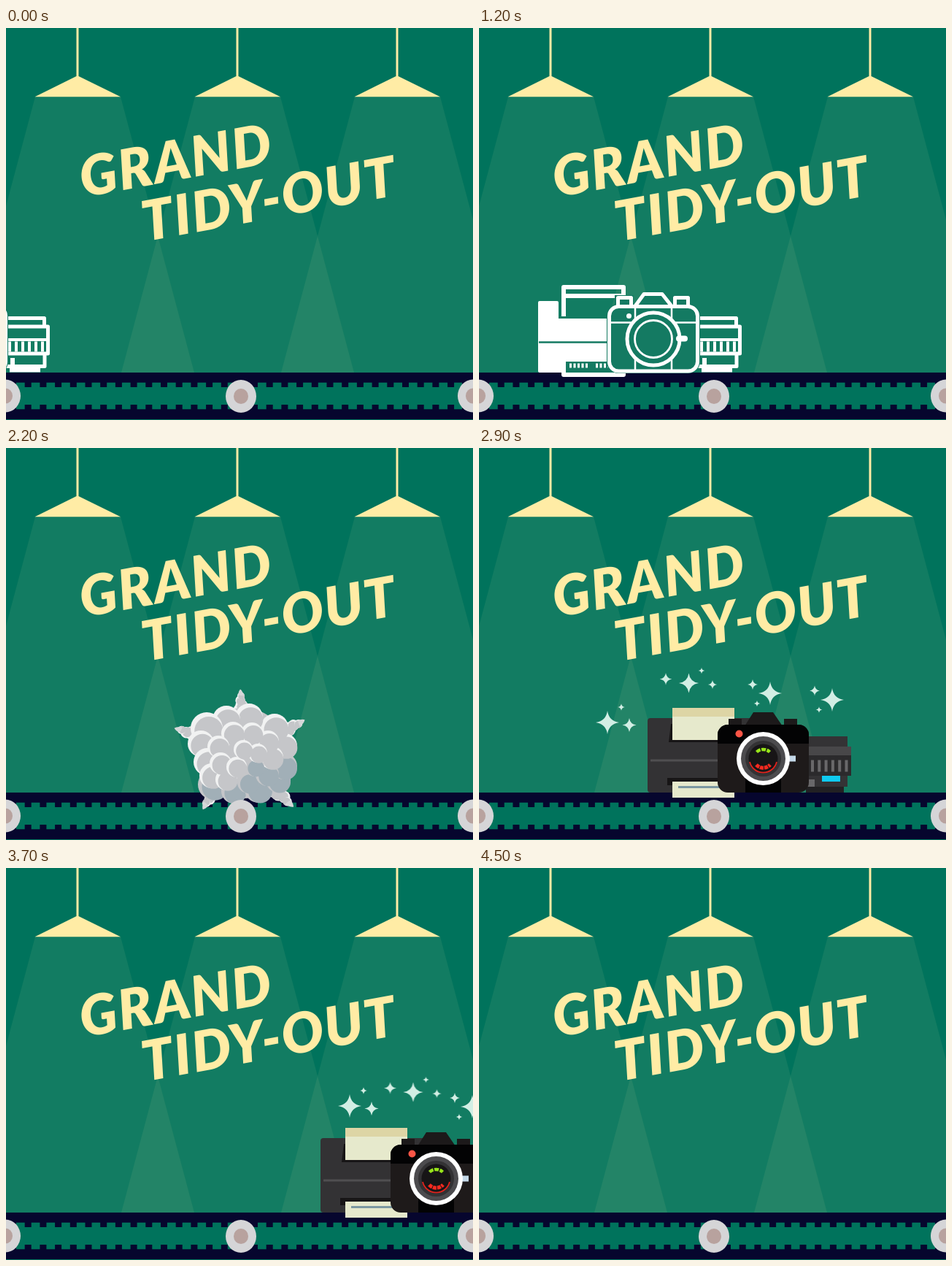
An HTML page without scripts for the animation above (5.5 s loop, 640 by 537 pixels).

```html
<!DOCTYPE html>
<html lang="en">
<head>
<meta charset="utf-8">
<title>Conveyor clean-up</title>
<style>
html, body { margin: 0; width: 100%; height: 100%; overflow: hidden; background: #00735c; }
svg { display: block; width: 100vw; height: 100vh; }
.title { font: italic 900 76px Lato, "Open Sans", sans-serif; letter-spacing: 2px; fill: #ffeca5; }
.dirty, .clean, .cloud, .inner, .stars g { animation: 5500ms step-end infinite; }
.dirty { animation-name: arrive; }
.cloud { animation-name: burst; transform-origin: 320px 413px; }
.inner { animation-name: churn; transform-origin: 322px 416px; }
.clean { animation-name: leave; }
.stars .a { animation-name: driftA; }
.stars .b { animation-name: driftB; }
.stars .c { animation-name: driftC; }
.stars .d { animation-name: driftD; }

@keyframes arrive {
  0% { transform: translateX(-400px); visibility: visible; animation-timing-function: steps(8, end); }
  29.09% { transform: none; visibility: visible; }
  32.72%, 100% { transform: none; visibility: hidden; }
}
@keyframes burst {
  0% { visibility: hidden; }
  32.72% { visibility: visible; transform: rotate(36deg); }
  36.36% { visibility: visible; transform: none; }
  43.63%, 100% { visibility: hidden; }
}
@keyframes churn {
  0% { transform: rotate(14deg); }
  40%, 100% { transform: none; }
}
@keyframes leave {
  0% { visibility: hidden; transform: translateX(-50px); }
  43.63% { visibility: visible; transform: translateX(-50px); }
  52.72% { visibility: visible; transform: none; animation-timing-function: steps(8, end); }
  81.81%, 100% { visibility: hidden; transform: translateX(400px); }
}
@keyframes driftA {
  0% { visibility: hidden; }
  43.63% { visibility: visible; transform: translate(-20px, 8px); }
  52.72% { visibility: visible; transform: none; }
  56.36% { visibility: visible; transform: translate(92px, -16px); }
  60% { visibility: visible; transform: translate(170px, -31px); }
  63.63% { visibility: visible; transform: translate(202px, -38px); }
  67.27% { visibility: visible; transform: translate(295px, -50px); }
  70.9% { visibility: visible; transform: translate(390px, -58px); }
  74.54%, 100% { visibility: hidden; }
}
@keyframes driftB {
  0% { visibility: hidden; }
  43.63% { visibility: visible; transform: translate(-30px, 6px); }
  52.72% { visibility: visible; transform: none; }
  56.36% { visibility: visible; transform: translate(68px, -5px); }
  60% { visibility: visible; transform: translate(135px, -13px); }
  63.63% { visibility: visible; transform: translate(202px, -14px); }
  67.27% { visibility: visible; transform: translate(270.5px, -15px); }
  70.9% { visibility: visible; transform: translate(337px, -11px); }
  74.54%, 100% { visibility: hidden; }
}
@keyframes driftC {
  0% { visibility: hidden; }
  43.63% { visibility: visible; transform: translate(-40px, 4px); }
  52.72% { visibility: visible; transform: none; }
  56.36% { visibility: visible; transform: translate(60px, -3px); }
  60% { visibility: visible; transform: translate(120px, -5px); }
  63.63% { visibility: visible; transform: translate(180px, -7px); }
  67.27% { visibility: visible; transform: translate(240px, -9px); }
  70.9%, 100% { visibility: hidden; }
}
@keyframes driftD {
  0% { visibility: hidden; }
  43.63% { visibility: visible; transform: translate(-42px, 3px); }
  52.72% { visibility: visible; transform: none; }
  56.36% { visibility: visible; transform: translate(55px, -3px); }
  60% { visibility: visible; transform: translate(105px, -5px); }
  63.63%, 100% { visibility: hidden; }
}
</style>
</head>
<body>
<svg viewBox="0 0 640 537" preserveAspectRatio="none">
  <defs>
    <g id="lamp" fill="#ffeca5">
      <path d="M40 94H157L258 472H-61Z" opacity=".072"/>
      <path d="M96.500 0h3V66L157 94.200H39.500L96.500 66Z"/>
    </g>
    <g id="wheel">
      <ellipse rx="21" ry="22.500" fill="#d5d5d7"/>
      <ellipse rx="10" ry="10.500" fill="#b8a29e"/>
    </g>
    <path id="star" d="M0-16Q2-2 16 0Q2 2 0 16Q-2 2-16 0Q-2-2 0-16Z"/>
    <g id="puff">
      <circle r="10" fill="#f1f2f2"/>
      <circle cx="1.300" cy="1.600" r="8.900" fill="#c5c6c9"/>
    </g>
    <g id="shade">
      <circle r="10" fill="#c5c6c9"/>
      <circle cx="1.300" cy="1.600" r="8.700" fill="#a1afb7"/>
    </g>
    <g id="spike">
      <use href="#puff" transform="translate(0 -62) scale(1.200)"/>
      <use href="#puff" transform="translate(1 -70) scale(.95)"/>
      <use href="#puff" transform="translate(-1 -78) scale(.75)"/>
      <use href="#puff" transform="translate(0 -85) scale(.55)"/>
      <path d="M-4-86Q-4-92-1-95Q3-92 4-85Z" fill="#d6d7d9"/>
    </g>
  </defs>

  <rect width="640" height="537" fill="#00735c"/>
  <use href="#lamp"/>
  <use href="#lamp" x="219"/>
  <use href="#lamp" x="438"/>

  <g class="title">
    <text transform="translate(106 232) rotate(-10.400)">GRAND</text>
    <text transform="translate(191 292.500) rotate(-10.400)">TIDY-OUT</text>
  </g>

  <!-- belt -->
  <rect y="472" width="640" height="64" fill="#06062e"/>
  <rect y="492" width="640" height="24" fill="#00735c"/>
  <path d="M14 489H310M345 489H625M14 519H310M345 519H625" stroke="#00735c" stroke-width="6.500" stroke-dasharray="11.700 9"/>

  <!-- worn devices -->
  <g class="dirty" fill="none" stroke="#fff">
    <path d="M183 374h24a2 2 0 0 1 2 2v22h70v74H183a2 2 0 0 1-2-2V376a2 2 0 0 1 2-2Z" fill="#fff" stroke="none"/>
    <path d="M182 430.500H277" stroke="#147a62" stroke-width="2.500"/>
    <path d="M216 395V355H298V372M216 367H298" stroke-width="6" stroke-linejoin="round"/>
    <path d="M213 457H300V475H216Z" fill="#147a62" stroke="none"/>
    <path d="M216 456V475H298V468" stroke-width="6" stroke-linejoin="round"/>
    <path d="M224 462.500H250M260 462.500H277" stroke-width="6" stroke-dasharray="3 2.500"/>

    <path d="M398 397.500H452.500V408M398 409H457.500V446H398M453 446V463.500H400" stroke-width="5" stroke-linejoin="round"/>
    <path d="M400 427H458M400 446H458" stroke-width="4"/>
    <path d="M403 436.500H455" stroke-width="14" stroke-dasharray="4 5"/>
    <path d="M405 468.500H447M409 452V465" stroke-width="6"/>

    <rect x="275" y="378" width="128" height="95" rx="16" fill="#147a62" stroke="none"/>
    <path d="M287 380V367H311V380M365 380V367H390V380" fill="#147a62" stroke="#147a62" stroke-width="2"/>
    <path d="M290.500 380V369.500H308.500V380M368.500 380V369.500H386.500V380M314 381L326 364.500H351L364 381" stroke-width="5" fill="#147a62" stroke-linejoin="round"/>
    <rect x="278.500" y="381.500" width="121" height="88.500" rx="13" fill="#147a62" stroke-width="5"/>
    <path d="M280 403.500H312M367 403.500H398M314 382V400M364 382V400M314 452V469M364 452V469" stroke-width="2.500"/>
    <circle cx="305.500" cy="394.500" r="3.500" fill="#fff" stroke="none"/>
    <circle cx="339" cy="426" r="36" fill="#147a62" stroke-width="5"/>
    <circle cx="339" cy="426" r="25.500" stroke-width="2.800"/>
    <path d="M374 425.500H382" stroke-width="8" stroke-linecap="round"/>
  </g>

  <!-- refreshed devices -->
  <g class="clean">
    <path d="M235 370H372V472H235a4 4 0 0 1-4-4V374a4 4 0 0 1 4-4Z" fill="#333234"/>
    <path d="M263 378H350V403H260ZM258 452H350V462H258Z" fill="#171516"/>
    <path d="M265 356H350V400H265ZM265 457H350V479H265Z" fill="#e6e9cc"/>
    <path d="M265 356H350V368H265Z" fill="#ddd5a5"/>
    <path d="M235 428H330" stroke="#504f51" stroke-width="3"/>
    <path d="M273 464.500H330" stroke="#7c98a1" stroke-width="3"/>

    <path d="M448 395H505V409H448ZM448 449H505V464H448Z" fill="#343335"/>
    <path d="M448 409H510V449H448Z" fill="#484749"/>
    <path d="M448 421H510V449H448Z" fill="#2b2a2c"/>
    <path d="M448 464H500V472H448Z" fill="#222123"/>
    <path d="M455 435.500H506" stroke="#69686a" stroke-width="16" stroke-dasharray="4 5.300"/>
    <path d="M470 449H495V457H470Z" fill="#0fcaf0"/>
    <path d="M448 454H460V464H448Z" fill="#69686a"/>

    <path d="M342 371H360V381H342ZM418 371H436V381H418ZM364 381L376 362H403L416 381Z" fill="#1c191a"/>
    <rect x="327" y="379" width="125" height="93" rx="14" fill="#1e1a1a"/>
    <path d="M327 405V393a14 14 0 0 1 14-14H438a14 14 0 0 1 14 14V405ZM365 405H414V472H365Z" fill="#030304"/>
    <circle cx="356.500" cy="391.500" r="5" fill="#fb5546"/>
    <path d="M425 421.500H434V429.500H425Z" fill="#c4d8e8"/>
    <circle cx="389.500" cy="425.500" r="36.500" fill="#fff"/>
    <circle cx="389.500" cy="425.500" r="30.500" fill="#4c4b4e"/>
    <circle cx="389.500" cy="425.500" r="24.500" fill="#333234"/>
    <circle cx="389.500" cy="425.500" r="20" fill="#171516"/>
    <g fill="none">
      <path d="M371 430A19 19 0 0 0 408 430" stroke="#e3231d" stroke-width="1.800"/>
      <path d="M380 434A13 13 0 0 0 399 434" stroke="#fb2a20" stroke-width="5" stroke-dasharray="5 1"/>
      <path d="M380.500 416.500A13 13 0 0 1 398.500 416.500" stroke="#98e51b" stroke-width="4.500" stroke-dasharray="6 1.500 6 1.500"/>
    </g>
  </g>

  <g class="cloud">
    <use href="#spike" transform="translate(322 416) scale(.9)"/>
    <use href="#spike" transform="translate(322 416) rotate(-70) scale(1.020)"/>
    <use href="#spike" transform="translate(322 416) rotate(64) scale(1.030)"/>
    <use href="#spike" transform="translate(322 416) rotate(-146)"/>
    <use href="#spike" transform="translate(322 416) rotate(137) scale(1.100)"/>
    <circle cx="325" cy="418" r="62" fill="#c5c6c9"/>
    <use href="#shade" transform="translate(284 461) scale(2.100)"/>
    <use href="#shade" transform="translate(312 470) scale(1.700)"/>
    <use href="#shade" transform="translate(346 467) scale(1.900)"/>
    <use href="#shade" transform="translate(373 455) scale(1.700)"/>
    <use href="#shade" transform="translate(381 436) scale(1.800)"/>
    <use href="#puff" transform="translate(382 408) scale(1.700)"/>
    <use href="#puff" transform="translate(368 383) scale(1.900)"/>
    <use href="#puff" transform="translate(333 369) scale(1.900)"/>
    <use href="#puff" transform="translate(302 372) scale(1.900)"/>
    <use href="#puff" transform="translate(275 384) scale(2.200)"/>
    <use href="#puff" transform="translate(267 405) scale(1.800)"/>
    <use href="#puff" transform="translate(276 430) scale(1.900)"/>
    <use href="#puff" transform="translate(282 449) scale(1.700)"/>
    <g class="inner">
      <use href="#puff" transform="translate(302 454) scale(1.500)"/>
      <use href="#shade" transform="translate(332 458) scale(1.500)"/>
      <use href="#shade" transform="translate(358 447) scale(1.600)"/>
      <use href="#puff" transform="translate(364 424) scale(1.600)"/>
      <use href="#puff" transform="translate(359 402) scale(1.500)"/>
      <use href="#puff" transform="translate(337 391) scale(1.500)"/>
      <use href="#puff" transform="translate(311 391) scale(1.600)"/>
      <use href="#puff" transform="translate(291 409) scale(1.500)"/>
      <use href="#puff" transform="translate(294 432) scale(1.500)"/>
      <use href="#shade" transform="translate(341 437) scale(1.300)"/>
      <use href="#puff" transform="translate(316 437) scale(1.400)"/>
      <use href="#puff" transform="translate(345 418) scale(1.300)"/>
      <use href="#puff" transform="translate(325 413) scale(1.300)"/>
    </g>
  </g>

  <g class="stars" fill="#d2eee4">
    <g class="a">
      <use href="#star" transform="translate(176 376)"/>
      <use href="#star" transform="translate(206 379.500) scale(.6)"/>
      <use href="#star" transform="translate(195 355) scale(.3)"/>
    </g>
    <g class="b">
      <use href="#star" transform="translate(256 316.500) scale(.52)"/>
      <use href="#star" transform="translate(287.500 322) scale(.85)"/>
      <use href="#star" transform="translate(305 305) scale(.27)"/>
      <use href="#star" transform="translate(320 324) scale(.38)"/>
    </g>
    <g class="c">
      <use href="#star" transform="translate(375 324) scale(.43)"/>
      <use href="#star" transform="translate(399 336)"/>
      <use href="#star" transform="translate(381 350) scale(.27)"/>
    </g>
    <g class="d">
      <use href="#star" transform="translate(460 332.500) scale(.43)"/>
      <use href="#star" transform="translate(484 345)"/>
      <use href="#star" transform="translate(466 358.500) scale(.27)"/>
    </g>
  </g>

  <use href="#wheel" x="-1" y="504"/>
  <use href="#wheel" x="322" y="504.500"/>
  <use href="#wheel" x="640" y="504"/>
</svg>
</body>
</html>
```
